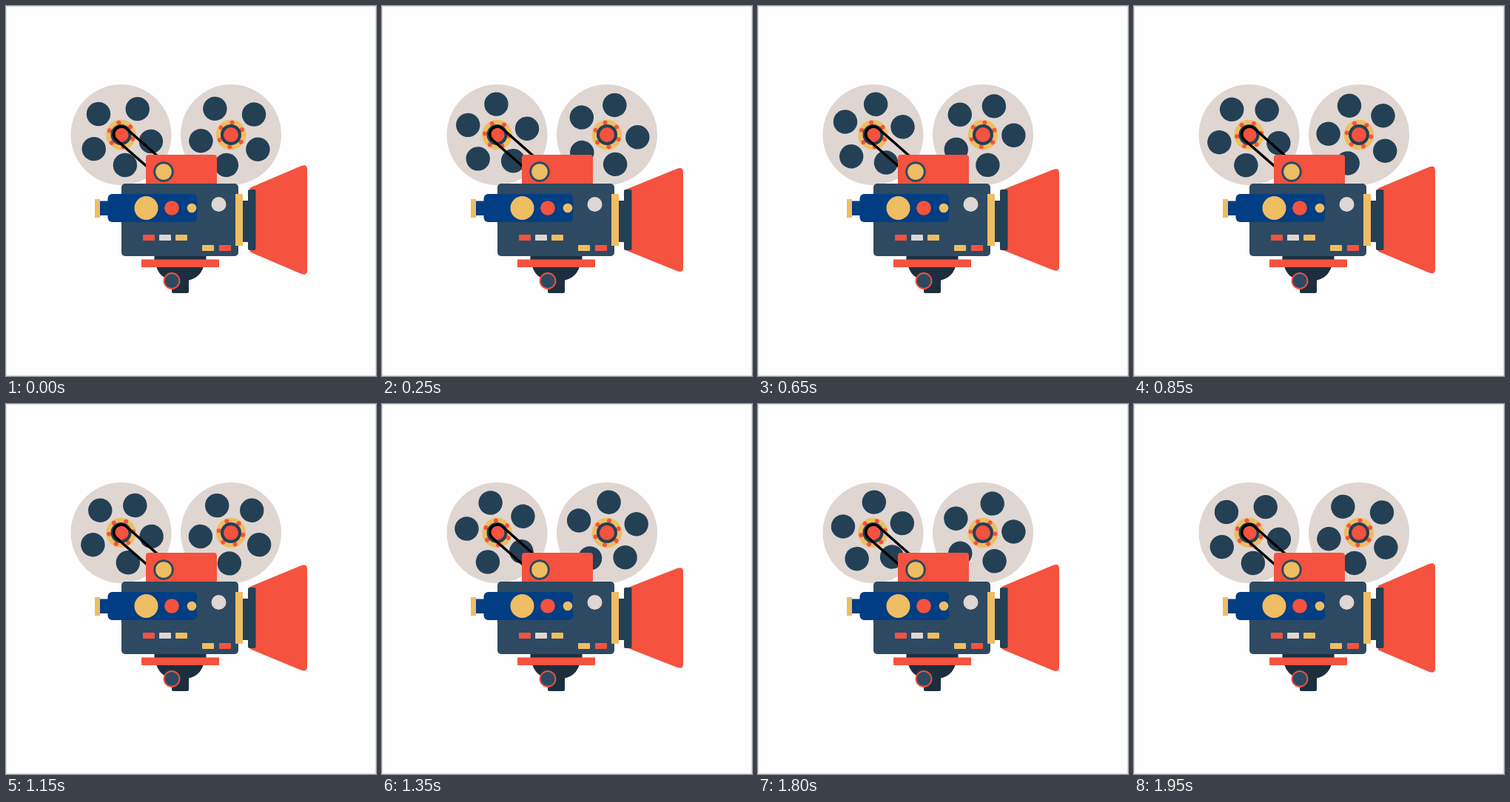
An HTML page for the animation above (2 s loop, 500 by 500 pixels).

```html
<!DOCTYPE html>
<html lang="en">
<head>
<meta charset="utf-8">
<title>Film camera</title>
<style>
  html, body { margin: 0; height: 100%; overflow: hidden; background: #fefefe; }
  svg { display: block; width: 100%; height: 100%; }
  .navy { fill: #2d4a62; }
  .dark { fill: #244055; }
  .ink { fill: #1d2f3f; }
  .blue { fill: #023e83; }
  .red { fill: #f5523f; }
  .gold { fill: #efbd62; }
  .pale { fill: #dfd6d2; }
</style>
</head>
<body>
<svg viewBox="0 0 500 500">
  <rect x=".5" y=".5" width="499" height="499" fill="none" stroke="#dcdcdc"/>

  <g id="reels"></g>

  <!-- drive belt -->
  <path d="M191 217.5L149.3 181A10 10 0 0 1 162.5 165.5L205 203" fill="none" stroke="#000" stroke-width="3.6"/>

  <!-- lens hood -->
  <path id="hood" class="red" d="M330 -43.5L399 -73Q407 -76 407 -68V68Q407 76 399 73L330 43.5Z"/>
  <rect class="dark" x="319" y="263" width="10" height="56"/>
  <rect class="dark" x="327" y="248" width="10.5" height="82" rx="2"/>

  <!-- mount -->
  <rect class="ink" x="224" y="366" width="23" height="22" rx="2"/>
  <path class="ink" d="M203 352H267Q261 372 235 372T203 352Z"/>
  <rect class="ink" x="200.500" y="336" width="70" height="8"/>
  <rect class="red" x="183" y="342.500" width="105" height="10.500"/>
  <circle class="navy" cx="224" cy="371.500" r="10.500" stroke="#f5523f" stroke-width="1.800"/>

  <!-- body -->
  <rect class="red" x="189" y="201" width="96" height="46" rx="4"/>
  <circle class="gold" cx="213" cy="224" r="12.300" stroke="#2d4a62" stroke-width="3"/>
  <rect class="navy" x="156" y="240" width="158" height="98" rx="5"/>
  <rect class="gold" x="310" y="254" width="10" height="70"/>
  <rect class="blue" x="126" y="263.500" width="16" height="19.500"/>
  <rect class="blue" x="137.500" y="254" width="120.500" height="38" rx="6"/>
  <rect class="gold" x="120" y="261" width="7" height="25"/>
  <circle class="gold" cx="189.500" cy="273" r="16"/>
  <circle class="red" cx="224" cy="273" r="9.800"/>
  <circle class="gold" cx="251" cy="273" r="6.300"/>
  <circle class="pale" cx="287.500" cy="268" r="10"/>
  <g id="keys"></g>
</svg>
<script>
const $ = id => document.getElementById(id);
const disc = (x, y, r, cls) => `<circle class="${cls}" cx="${x}" cy="${y}" r="${r}"/>`;
const polar = (deg, dist, r, cls) => {
  const a = deg * Math.PI / 180;
  return disc(dist * Math.cos(a), dist * Math.sin(a), r, cls);
};

// The five holes are 70 degrees apart, leaving one gap of 80.
const holes = [0, 80, 150, 220, 290].map(a => polar(a, 41.4, 16.2, 'dark')).join('');
const studs = [0, 60, 120, 180, 240, 300].map(a => polar(a + 37, 16.5, 3, 'red')).join('');

const reels = [{ x: 155.5, start: 222.5 }, { x: 304, start: 238.5 }];
$('reels').innerHTML = reels.map(({ x }) =>
  `<g transform="translate(${x} 174)">${disc(0, 0, 68, 'pale')}<g class="spin">${holes}` +
  `${disc(0, 0, 20.3, 'gold')}${studs}</g>${disc(0, 0, 14, 'dark')}${disc(0, 0, 10, 'red')}</g>`
).join('');
const spins = document.querySelectorAll('.spin');

$('keys').innerHTML = [
  [185, 309, 'red'], [207, 309, 'pale'], [229, 309, 'gold'], [265, 323, 'gold'], [288, 323, 'red']
].map(([x, y, cls]) => `<rect class="${cls}" x="${x}" y="${y}" width="16" height="8" rx="1"/>`).join('');

const begin = performance.now();

function draw() {
  const t = (performance.now() - begin) % 2000;
  // 48 poses at 24 per second, shown 20 times per second
  const turn = Math.round(Math.floor(t / 50) * 1.2) / 47;
  spins.forEach((g, i) => g.setAttribute('transform', `rotate(${reels[i].start + turn * 360})`));
  const stretch = 0.951 + 0.049 * Math.cos(turn * 4 * Math.PI);
  $('hood').setAttribute('transform', `translate(0 289) scale(1 ${stretch})`);
  requestAnimationFrame(draw);
}
draw();
</script>
</body>
</html>
```
